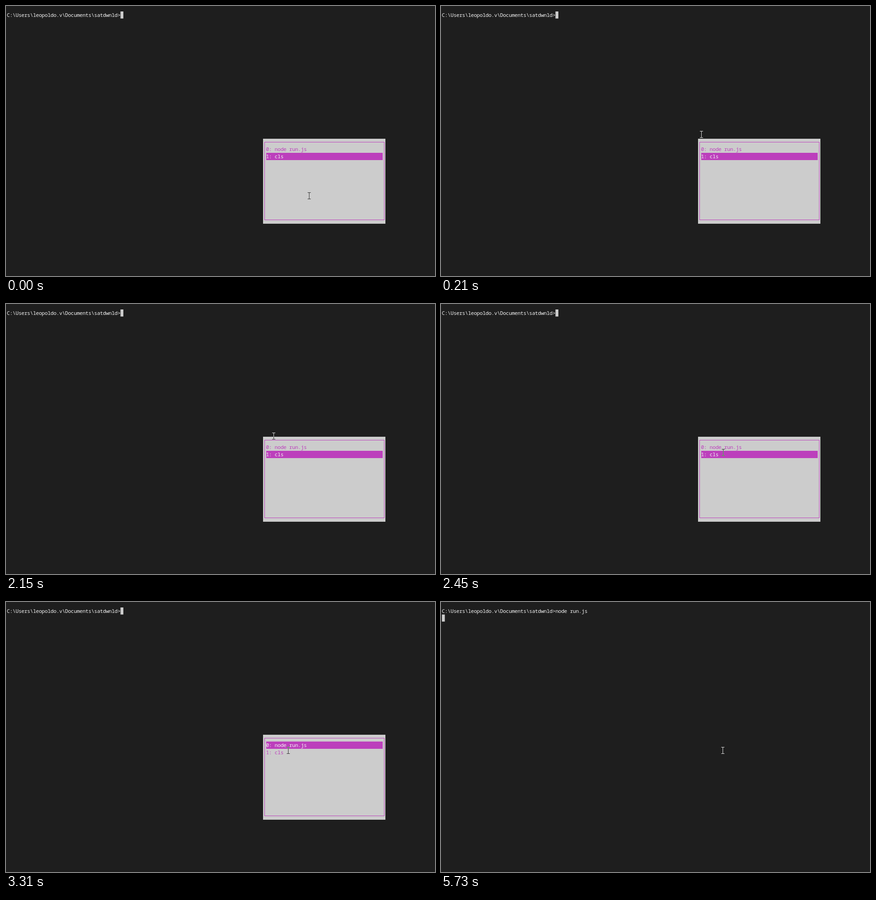
Animation, 943 px wide and 594 px high, one loop 8 s. Source, as an HTML page with a canvas:

```html
<!DOCTYPE html>
<html lang="en">
<head>
<meta charset="utf-8">
<title>Terminal command history</title>
<style>
  html, body { margin: 0; width: 100%; height: 100%; overflow: hidden; background: #1e1e1e; }
  canvas { display: block; }
</style>
</head>
<body>
<canvas id="stage" width="943" height="594"></canvas>
<script>
const ctx = document.getElementById('stage').getContext('2d');
const LOOP = 8000;
const CELL_W = 6.4, CELL_H = 15.55, LEFT = 2, TOP = 12;
const BACK = '#1e1e1e', GRAY = '#cccccc', MAGENTA = '#bc3fbc', WHITE = '#f4f4f4';
const PROMPT = 'C:\\Users\\leopoldo.v\\Documents\\satdwnld>';
const HISTORY = ['node run.js', 'cls'];
const PANEL = { col: 88, row: 18, cols: 42, rows: 12 };
const SELECT_AT = 3310, RUN_AT = 4240, NUDGE_AT = 5730;

const colX = col => LEFT + col * CELL_W;
const rowY = row => TOP + row * CELL_H;

function fillCells(col, row, cols, rows, color) {
  const x = Math.round(colX(col)), y = Math.round(rowY(row));
  ctx.fillStyle = color;
  ctx.fillRect(x, y, Math.round(colX(col + cols)) - x, Math.round(rowY(row + rows)) - y);
}

function drawCaret(col, row) {
  ctx.fillStyle = GRAY;
  ctx.fillRect(colX(col), rowY(row), CELL_W, CELL_H);
}

// Each character is centred in its cell of the terminal grid.
function print(text, col, row, color) {
  ctx.fillStyle = color;
  const y = Math.round(rowY(row) + 11.7);
  [...text].forEach((ch, i) => ctx.fillText(ch, colX(col + i + 0.5), y));
}

function drawMenu(selected) {
  const { col, row, cols, rows } = PANEL;
  fillCells(col, row, cols, rows, GRAY);
  const x = Math.round(colX(col + 0.5)), y = Math.floor(rowY(row + 0.5));
  const right = Math.round(colX(col + cols - 0.5));
  const bottom = Math.floor(rowY(row + rows - 0.5));
  ctx.strokeStyle = MAGENTA;
  ctx.lineWidth = 1;
  ctx.strokeRect(x + 0.5, y + 0.5, right - x, bottom - y);
  HISTORY.forEach((command, i) => {
    const active = i === selected;
    if (active) fillCells(col + 1, row + 1 + i, cols - 2, 1, MAGENTA);
    print(`${i}: ${command}`, col + 1, row + 1 + i, active ? WHITE : MAGENTA);
  });
}

// Moves in discrete steps, the first at `start` and the last at `end`.
function glide(t, start, end, steps, first, from, to) {
  const step = Math.min(steps - 1, Math.floor((t - start) / (end - start) * (steps - 1) + 1e-6));
  const p = first + (1 - first) * step / (steps - 1);
  const k = p * (1.4 - 0.4 * p);
  return from.map((v, i) => Math.round(v + (to[i] - v) * k));
}

function pointerAt(t) {
  if (t < 80) return [663, 410];
  if (t < 2150) return glide(t, 80, 210, 3, 1 / 3, [663, 410], [569, 275]);
  if (t < NUDGE_AT) return glide(t, 2150, 2450, 5, 0, [585, 283], [617, 319]);
  return [616, 319];
}

// The I-beam inverts whatever lies under it.
function drawPointer([x, y]) {
  ctx.globalCompositeOperation = 'difference';
  ctx.fillStyle = '#fff';
  ctx.fillRect(x, y, 7, 1);
  ctx.fillRect(x + 3, y + 1, 1, 13);
  ctx.fillRect(x, y + 14, 7, 1);
  ctx.globalCompositeOperation = 'source-over';
}

function draw(t) {
  ctx.fillStyle = BACK;
  ctx.fillRect(0, 0, 943, 594);
  ctx.font = '500 11.3px "Noto Sans Mono", "DejaVu Sans Mono", monospace';
  ctx.textAlign = 'center';
  ctx.textBaseline = 'alphabetic';
  const running = t >= RUN_AT;
  print(PROMPT + (running ? HISTORY[0] : ''), 0, 0, WHITE);
  if (running) {
    drawCaret(0, 1);
  } else {
    drawCaret(PROMPT.length, 0);
    drawMenu(t < SELECT_AT ? 1 : 0);
  }
  drawPointer(pointerAt(t));
}

const began = performance.now();
function tick() {
  draw((performance.now() - began) % LOOP);
  requestAnimationFrame(tick);
}
tick();
</script>
</body>
</html>
```
